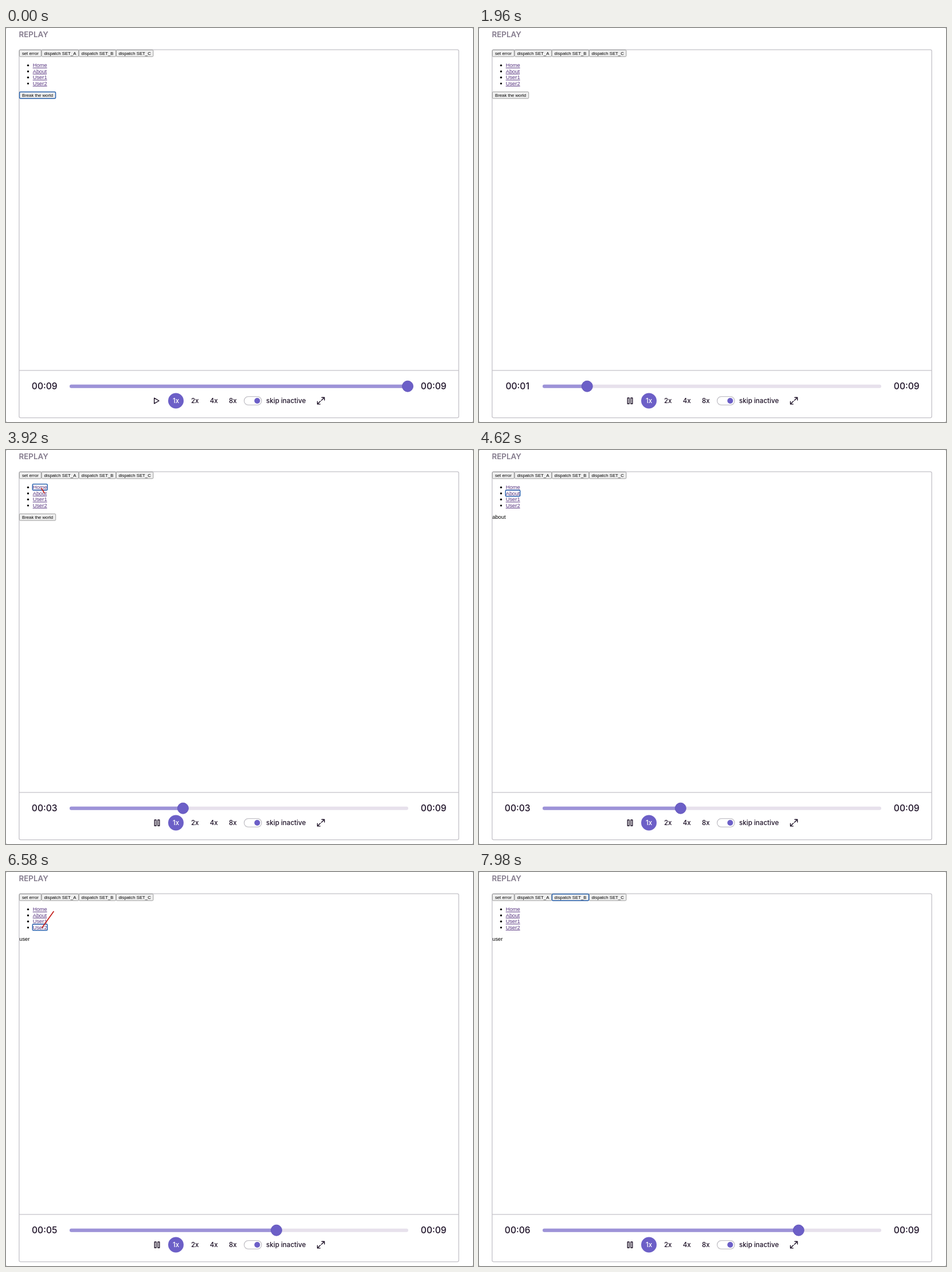
Recreate the animation shown at these times as an HTML page. Size 815 by 687 pixels, loop 8000 ms.

```html
<!DOCTYPE html>
<html lang="en">
<head>
<meta charset="utf-8">
<title>Replay</title>
<style>
  html, body { margin: 0; width: 100%; height: 100%; overflow: hidden; background: #fff; }
  svg { display: block; width: 815px; height: 687px; }
  .ui { font: 450 11.6px Inter, sans-serif; fill: #1d1127; }
  .time { font-size: 15.6px; text-anchor: middle; }
  .head { font: 600 13.4px Inter, sans-serif; fill: #837a8c; }
  .page { font: 9.36px "Liberation Sans", Arial, sans-serif; fill: #000; }
  .link { fill: #56337f; text-decoration: underline; }
  .button text { font-size: 7.8px; text-anchor: middle; }
  .button rect { fill: #efefef; stroke: #858585; stroke-width: .8; }
  .icon { fill: none; stroke: #1d1127; stroke-width: 1.4; stroke-linejoin: round; stroke-linecap: round; }
  .line { fill: none; stroke: #c4c2c8; stroke-width: 1.3; }
  #ring { fill: none; stroke: #2f67b2; stroke-width: 1.5; }
  #tail { fill: none; stroke: #c3221f; stroke-width: 1.8; stroke-linejoin: round; stroke-linecap: round; }
</style>
</head>
<body>
<svg viewBox="0 0 815 687">
  <rect width="815" height="687" fill="#aaa"/>
  <rect width="815" height="687" rx="2" fill="#fff"/>
  <text class="head" x="22.5" y="15.6">REPLAY</text>
  <rect class="line" x="22.9" y="37.8" width="767.2" height="641.8" rx="2.5"/>
  <path class="line" d="M23 597.2H790"/>

  <g class="page">
    <g id="chrome"></g>
    <g id="home"></g>
    <text id="body" x="23.2" y="119.8"></text>
  </g>
  <rect id="ring" rx="1.5"/>
  <polyline id="tail"/>

  <g class="ui">
    <text id="clock" class="time" x="67.2" y="630"></text>
    <text class="time" x="746.2" y="630">00:09</text>
    <rect x="111" y="621.8" width="591" height="5.9" rx="2.9" fill="#e7e1ec"/>
    <rect id="fill" x="111" y="621.8" height="5.9" rx="2.9" fill="#9d93d8"/>
    <circle id="knob" cy="624.7" r="9.5" fill="#6c5fc7" stroke="#6457bb"/>

    <path id="play" class="icon" d="M258.7 645.2L267 650L258.7 654.9Z"/>
    <path id="pause" class="icon" d="M259.3 645h2.8v10.2h-2.8zM265 645h2.8v10.2h-2.8z"/>
    <circle cx="296.5" cy="650" r="13.5" fill="#6c5fc7"/>
    <g id="speeds" text-anchor="middle"></g>
    <rect class="line" x="415.6" y="642.6" width="30.4" height="14.8" rx="7.4"/>
    <circle cx="438.4" cy="650" r="5" fill="#6c5fc7"/>
    <text x="454" y="654.2">skip inactive</text>
    <path class="icon" d="M551 644.2h4.7v4.7M555.4 644.5L550.6 649.3M548.2 655.9h-4.7v-4.7M543.8 655.6L548.6 650.8"/>
  </g>
</svg>
<script>
const LOOP = 8000, TICK = 70, PRESS = 490, RESET = 770;
const TAIL_LIFE = 500, TAIL_STEP = 20;
const BAR = { left: 111, right: 701, seconds: 9.1, start: 68.6, speed: 0.0613 };
const $ = id => document.getElementById(id);

function set(el, attrs) {
  for (const k in attrs) el.setAttribute(k, attrs[k]);
  return el;
}

function add(parent, tag, attrs, text = "") {
  const el = set(document.createElementNS(parent.namespaceURI, tag), attrs);
  el.textContent = text;
  parent.append(el);
  return el;
}

// Builders return the box of the focus ring
function button(parent, label, x, y, width) {
  const g = add(parent, "g", { class: "button" });
  add(g, "rect", { x, y, width, height: 11.6, rx: 1.5 });
  add(g, "text", { x: x + width / 2, y: y + 8.6 }, label);
  return { x: x + .2, y: y + .2, width: width - .4, height: 11.2 };
}

function link(label, row) {
  const y = 68.3 + row * 10.53;
  add($("chrome"), "circle", { cx: 38.5, cy: y - 3.1, r: 1.65 });
  const text = add($("chrome"), "text", { x: 46.7, y, class: "link" }, label);
  return { x: 46.3, y: y - 8.8, width: text.getComputedTextLength() + 1, height: 10.6 };
}

button($("chrome"), "set error", 23.4, 38.3, 38);
const [setA, setB] = ["A", "B", "C"].map((c, i) =>
  button($("chrome"), "dispatch SET_" + c, 62.2 + i * 65.1, 38.3, 64.5));
const [home, about, user1, user2] = ["Home", "About", "User1", "User2"].map(link);
const breaker = button($("home"), "Break the world", 23.4, 111.3, 63.3);
for (let i = 0; i < 4; i++) {
  add($("speeds"), "text", { x: 296.6 + i * 33.1, y: 654.2, fill: i ? "#1d1127" : "#fff" }, 2 ** i + "x");
}

const clicks = [
  { at: 0, focus: breaker, page: "home" },
  { at: PRESS + TICK, focus: null, page: "home" },
  { at: 3400, focus: home, page: "home" },
  { at: 4500, focus: about, page: "about" },
  { at: 5180, focus: user1, page: "user" },
  { at: 6080, focus: user2, page: "user" },
  { at: 6950, focus: setA, page: "user" },
  { at: 7700, focus: setB, page: "user" },
];

// Pointer strokes: it rests at the end of each until the next begins
const strokes = [
  { at: 800, time: 460, from: [330, 104], to: [106, 84] },
  { at: 1260, time: 140, to: [66, 56] },
  { at: 2080, time: 150, to: [96, 76] },
  { at: 2230, time: 370, to: [62, 67] },
  { at: 3600, time: 220, to: [67, 75] },
  { at: 4800, time: 300, to: [65, 88] },
  { at: 5800, time: 180, to: [63, 97] },
  { at: 6300, time: 280, to: [83, 69] },
  { at: 6580, time: 170, to: [95, 44] },
  { at: 7300, time: 170, to: [155, 44] },
];
strokes.forEach((s, i) => s.from ??= strokes[i - 1].to);

function pointer(t) {
  const s = strokes.findLast(s => s.at <= t);
  const k = Math.min(1, (t - s.at) / s.time);
  return s.from.map((v, i) => v + (s.to[i] - v) * k);
}

const show = (id, on) => $(id).style.display = on ? "" : "none";

function draw(t) {
  const x = t < RESET ? BAR.right : BAR.start + BAR.speed * t;
  const part = (x - BAR.left) / (BAR.right - BAR.left);
  set($("knob"), { cx: x });
  set($("fill"), { width: x - BAR.left });
  $("clock").textContent = "00:0" + Math.floor(part * BAR.seconds);
  show("play", t < PRESS);
  show("pause", t >= PRESS);

  const { focus, page } = clicks.findLast(c => c.at <= t);
  show("home", page === "home");
  $("body").textContent = page === "home" ? "" : page;
  show("ring", focus);
  if (focus) set($("ring"), focus);

  const tail = [];
  for (let u = Math.max(strokes[0].at, t - TAIL_LIFE); u <= t; u += TAIL_STEP) tail.push(pointer(u));
  const moved = tail.length && String(tail[0]) !== String(tail.at(-1));
  show("tail", moved);
  if (moved) set($("tail"), { points: tail.join(" ") });
}

const start = performance.now();
function loop() {
  const t = (performance.now() - start) % LOOP;
  draw(Math.floor(t / TICK) * TICK);
  requestAnimationFrame(loop);
}
loop();
</script>
</body>
</html>
```
